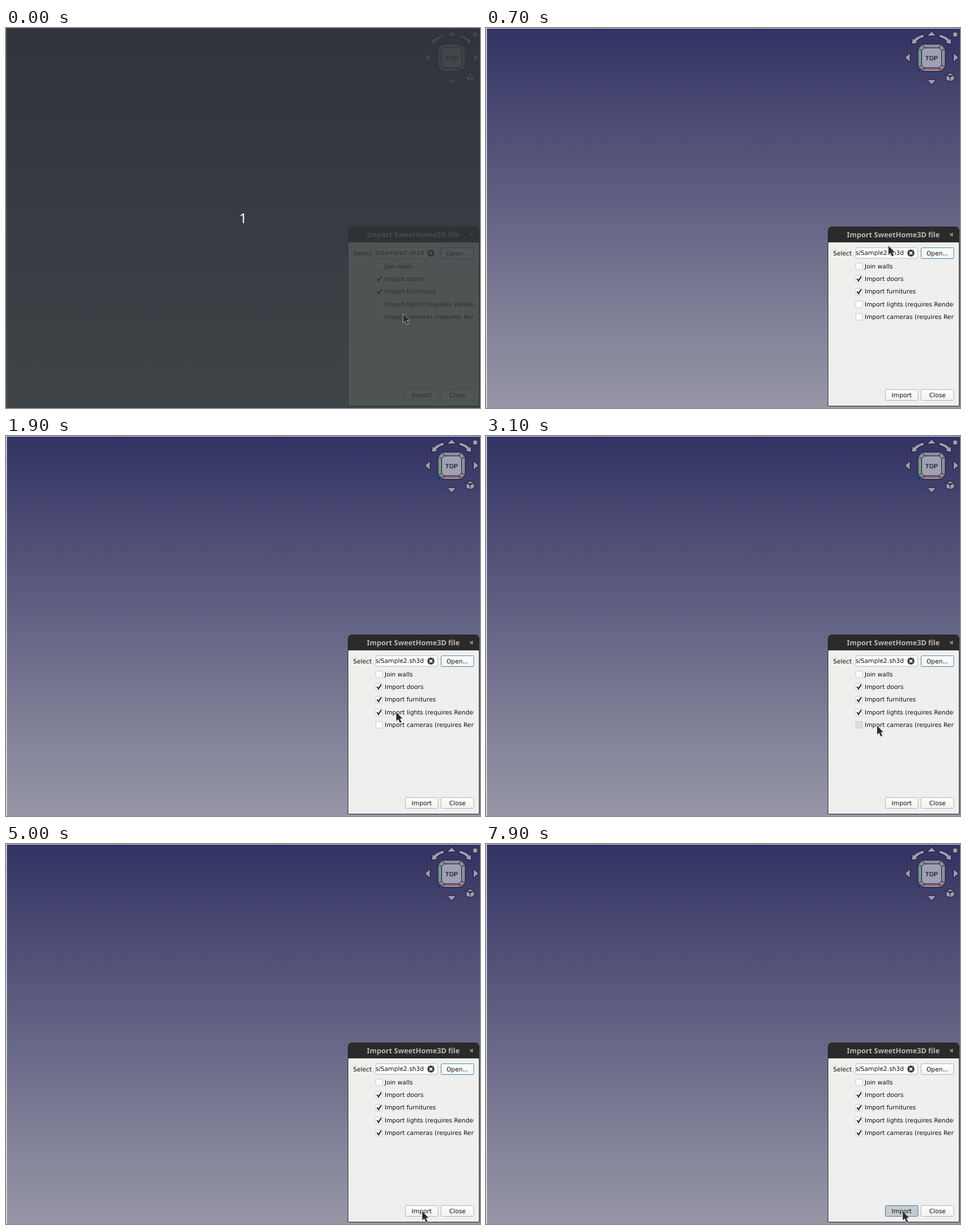
These frames come from a looping animation (835x670 px, 8 s). An HTML page:

```html
<!DOCTYPE html>
<html lang="en">
<head>
<meta charset="utf-8">
<title>Import dialog</title>
<style>
  html, body { margin: 0; width: 100%; height: 100%; overflow: hidden; }
  svg { display: block; }
  text { font: 10.667px "DejaVu Sans", sans-serif; fill: #101010; text-rendering: geometricPrecision; }
  .mid { text-anchor: middle; }
  .title { font: bold 12.67px "Noto Sans", sans-serif; fill: #b9b7b3; }
  .count { font: 24px "Noto Sans", sans-serif; fill: #fff; }
  .face { font: bold 11px "Liberation Sans", sans-serif; fill: #2a2a35; }
  .nav { fill: #9c9cb0; stroke: #14141c; stroke-width: 1; stroke-linejoin: round; }
  .button { fill: url(#buttonFill); stroke: #b4b4b2; }
  .button.focus { stroke: #3d8ab8; }
  .button.down { fill: #c6cbce; stroke: #3d7ea6; }
  .box { fill: #fff; stroke: #c6c6c4; }
  .box.down { fill: #dededc; }
  .tick { fill: none; stroke: #111; stroke-width: 1.9; }
</style>
</head>
<body>
<svg id="stage" width="835" height="670" viewBox="0 0 835 670">
  <defs>
    <linearGradient id="sky" x2="0" y2="1">
      <stop stop-color="#333364"/><stop offset="1" stop-color="#9797a7"/>
    </linearGradient>
    <linearGradient id="buttonFill" x2="0" y2="1">
      <stop stop-color="#fefefe"/><stop offset="1" stop-color="#f3f3f2"/>
    </linearGradient>
    <clipPath id="fieldClip"><rect x="652" y="388" width="88" height="18"/></clipPath>
    <clipPath id="labelClip"><rect x="660" y="408" width="164" height="120"/></clipPath>
  </defs>

  <rect width="835" height="670" fill="#e9e9ec"/>
  <rect x="1.5" y="1" width="833.5" height="669" fill="url(#sky)"/>

  <g class="nav">
    <path d="M785 6l8 8h-16zM785 100l8-9h-16zM738 52l9-8v16zM832.5 52l-9-8v16z"/>
    <path id="turn" d="M771 11Q759 14 754 20L751 18L750 29L761 26L758 23.500Q763 18 772 16Z"/>
    <use href="#turn" transform="matrix(-1 0 0 1 1570 0)"/>
    <circle cx="826.5" cy="11.500" r="4.500"/>
    <path d="M818 79.500l7 3.500v8l-7 3.500l-7.500-3v-8.500zM810.500 83l7 3.500l7.500-3.500M817.500 86.500v8"/>
    <path d="M769 28.500h32l8 8v32l-8 8h-32l-8-8v-32z" fill="#8c8ca1"/>
    <path d="M769 28.500l3 6.500M801 28.500l-3 6.500M809 36.500l-6.500 3M809 68.500l-6.500-3M801 76.500l-3-6.500M769 76.500l3-6.500M761 68.500l6.500-3M761 36.500l6.500 3" fill="none"/>
    <path d="M772 35h26l4.500 4.500v26l-4.500 4.500h-26l-4.500-4.500v-26z" fill="#a0a0b4"/>
  </g>
  <g fill="none">
    <path d="M766.500 38v34" stroke="#1fae3a"/>
    <path d="M767 72h37" stroke="#a82030"/>
    <path d="M766 72l-7 6" stroke="#1414e0" stroke-width="1.200"/>
  </g>
  <text class="face mid" x="785" y="56.500">TOP</text>

  <path d="M602.500 666.500V359q0-8.500 8.500-8.500h214q8.500 0 8.500 8.500v307.500z" fill="#efefed" stroke="#2b2b2b"/>
  <path d="M602 378V359q0-9 9-9h214q9 0 9 9v19z" fill="#2b2a2a"/>
  <text class="title mid" x="717.500" y="369.200">Import SweetHome3D file</text>
  <path d="M817.500 361.500l5.500 5.500m0-5.500l-5.500 5.500" stroke="#b9b7b3" stroke-width="1.100"/>

  <text x="611.500" y="400.500">Select</text>
  <rect x="651.500" y="387.500" width="109" height="18.500" rx="2" fill="#fff" stroke="#b8b8b6"/>
  <text x="736" y="400" text-anchor="end" clip-path="url(#fieldClip)">s/Sample2.sh3d</text>
  <circle cx="748.500" cy="396.800" r="6.300" fill="#3c3c3c"/>
  <path d="M746 394.300l5 5m0-5l-5 5" stroke="#fff" stroke-width="1.700"/>

  <g id="options"></g>
  <g id="buttons"></g>

  <g id="tooltip">
    <rect x="586" y="659" width="149" height="14" fill="#000" opacity=".12"/>
    <rect x="587.500" y="660.500" width="145" height="19" fill="#ffffdc" stroke="#111"/>
    <text x="589.500" y="671.300">Import SweetHome3D file</text>
  </g>

  <g id="countdown">
    <rect width="835" height="670" fill="#2e3436" opacity=".83"/>
    <text class="count mid" x="417.500" y="344">1</text>
  </g>

  <path id="cursor" d="M0 0V15.500L3.600 12.300L6.400 18.800L9.200 17.600L6.400 11.200H11Z"
        fill="#2b2b2b" stroke="#fff" stroke-width="1" paint-order="stroke"/>
</svg>

<script>
const LOOP = 8000;
const byId = id => document.getElementById(id);

// label, centre y, time pressed, time ticked (0 = ticked from the start)
const options = [
  ["Join walls", 420.5, Infinity, Infinity],
  ["Import doors", 442.5, 0, 0],
  ["Import furnitures", 465, 0, 0],
  ["Import lights (requires Render)", 487.5, 1700, 1900],
  ["Import cameras (requires Render)", 509.5, 3100, 3200],
];

const buttons = [["Open...", 767, 387], ["Import", 704, 637], ["Close", 767, 637]];

// start time, then one pointer position per 100 ms; the last one holds
const moves = [
  [0, [699.5, 504]],
  [400, [702, 485], [706, 448], [709, 408], [709, 384], [705, 402],
        [697, 440], [690, 474], [693.5, 495.5], [692.5, 495.5]],
  [1300, [690.5, 492], [688.5, 489], [687.5, 487]],
  [2200, [688.5, 492], [689, 497]],
  [2500, [689, 511]],
  [4300, [701.5, 519.5], [711, 536], [718, 558], [723.5, 582], [727.5, 606],
         [730.5, 627], [732.5, 641], [733.3, 648], [733.5, 650]],
  [5200, [733.8, 649], [734.2, 648]],
];

byId("options").innerHTML = options.map(([label, y]) => `
  <rect class="box" x="651.5" y="${y - 6}" width="11.500" height="11.500" rx="1"/>
  <path class="tick" d="M653.500 ${y - .5}L656.300 ${y + 3.2}L661 ${y - 4.5}"/>
  <text x="667" y="${Math.round(y + 3.4)}" clip-path="url(#labelClip)">${label}</text>`).join("");

byId("buttons").innerHTML = buttons.map(([label, x, y]) => `
  <rect class="button" x="${x - .5}" y="${y + .5}" width="57.500" height="19" rx="2"/>
  <text class="mid" x="${x + 28.3}" y="${y + 14}">${label}</text>`).join("");

const boxes = document.querySelectorAll(".box");
const ticks = document.querySelectorAll(".tick");
const [openButton, importButton] = document.querySelectorAll(".button");
const show = (el, on) => el.style.display = on ? "" : "none";

function pointerAt(t) {
  const [start, ...steps] = moves.findLast(([from]) => from <= t);
  return steps[Math.min(steps.length - 1, Math.floor((t - start) / 100))];
}

function draw(t) {
  options.forEach(([, , pressed, ticked], i) => {
    boxes[i].classList.toggle("down", t >= pressed && t < ticked);
    show(ticks[i], t >= ticked);
  });
  const clicked = t >= 7900;
  openButton.classList.toggle("focus", !clicked);
  importButton.classList.toggle("down", clicked);
  show(byId("tooltip"), t >= 6000 && !clicked);
  show(byId("countdown"), t < 100);
  byId("cursor").setAttribute("transform", `translate(${pointerAt(t)})`);
}

function tick() {
  draw(performance.now() % LOOP);
  requestAnimationFrame(tick);
}
draw(0);
requestAnimationFrame(tick);
</script>
</body>
</html>
```
